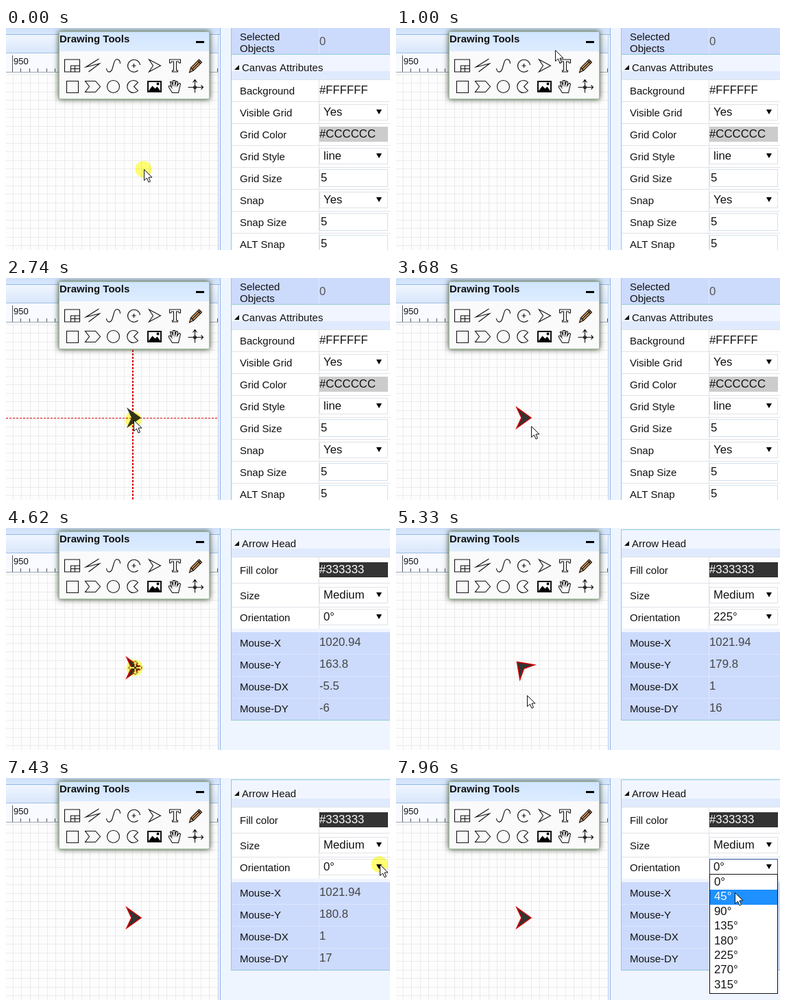
An HTML page with a canvas for the animation above (8000 ms loop, 560 px wide and 324 px high).

```html
<!DOCTYPE html>
<html lang="en">
<head>
<meta charset="utf-8">
<title>Arrow head orientation</title>
<style>
html, body { margin: 0; width: 100%; height: 100%; overflow: hidden; background: #eff5ff; }
canvas { display: block; }
</style>
</head>
<body>
<canvas id="stage" width="560" height="324"></canvas>
<script>
const c = document.getElementById('stage').getContext('2d');
const LOOP = 8000, GRID = 12.45, GX = 10, GY = 68, UNIT = 2.5, ROW = 32, ITEM = 21.4;
const SANS = '"Liberation Sans", Arial, sans-serif';
const TEAL = '#8fcbd9', BLUE = '#ccdafc', PALE = '#f0f5ff', LINE = '#dfe2e8', INK = '#111';

// Each move curves from the previous end, past a bend, in held steps
const moves = [
  { from: 590, to: 830, steps: 4, bend: [285, 110], end: [232, 27] },
  { from: 1000, to: 1480, steps: 7, bend: [234, 44], end: [214, 54] },
  { from: 1630, to: 2110, steps: 7, bend: [249, 225], end: [186, 207] },
  { from: 3590, to: 3920, steps: 5, bend: [203, 222], end: [203, 219] },
  { from: 4380, to: 4620, steps: 4, end: [188, 204] },
  { from: 4780, to: 4930, steps: 3, end: [191, 244] },
  { from: 5940, end: [191, 245.3] },
  { from: 6410, end: [191, 247] },
  { from: 6960, to: 7350, steps: 6, bend: [400, 150], end: [545, 126] },
  { from: 7740, to: 7960, steps: 4, end: [494, 167] }
];
const clicks = [[0, 590], [1400, 1480], [2570, 3440], [4230, 4780], [7430, 7740]];

function pointer(t) {
  let pos = [201, 206];
  for (const { from, to, steps = 1, bend, end } of moves) {
    if (t < from) break;
    const k = steps > 1 ? Math.floor((t - from) / (to - from) * (steps - 1) + 1e-6) : 0;
    const p = Math.min(1, (k + 1) / steps), q = 1 - p;
    pos = pos.map((a, i) => {
      const mid = bend ? bend[i] : (a + end[i]) / 2;
      return q * q * a + 2 * p * q * mid + p * p * end[i];
    });
  }
  return pos;
}

// Canvas coordinates, then distance from where the drag began
function mouse(t) {
  const [x, y] = pointer(Math.min(t, 6959));
  const units = px => Math.round(px / UNIT * 2) / 2;
  const [ax, ay] = t < 4780 ? [5.5, 6] : [0, 0];
  const dx = units(x - 188 - ax * UNIT), dy = units(y - 204 - ay * UNIT);
  return [1020.94 + ax + dx, 163.8 + ay + dy, dx, dy];
}

const angle = t => t < 5080 || t >= 6090 ? 0 : t < 5330 ? 45 : t < 5630 ? 225 : 315;

function rect(x, y, w, h, fill) { c.fillStyle = fill; c.fillRect(x, y, w, h); }

function frame(x, y, w, h, color, fill) {
  rect(x, y, w, h, color);
  rect(x + 1, y + 1, w - 2, h - 2, fill);
}

function text(s, x, y, size = 15, color = INK, weight = '') {
  c.font = `${weight} ${size}px ${SANS}`;
  c.fillStyle = color;
  c.fillText(s, x, y);
}

const value = (s, x, y, color) => text(s, x, y, 16.8, color);

function vGrad(y0, y1, a, b) {
  const g = c.createLinearGradient(0, y0, 0, y1);
  g.addColorStop(0, a);
  g.addColorStop(1, b);
  return g;
}

function shape(d, x, y, fill, stroke, width = 1, deg = 0) {
  const p = new Path2D(d);
  c.save();
  c.translate(x, y);
  c.rotate(deg * Math.PI / 180);
  c.lineWidth = width;
  if (fill) { c.fillStyle = fill; c.fill(p); }
  if (stroke) { c.strokeStyle = stroke; c.stroke(p); }
  c.restore();
}

const HEAD = 'M12 0L-9-15L-2 0L-9 15Z';
const ARROW = 'M0 0V16L4 12.5L6.500 18.500L9 17.500L6.500 11.500H11.500Z';
const icons = [
  'M-11-9H11V9H-11ZM-2 9V0H11M-2 4.500H11M4 0V9',
  'M9-10L-10 2L10-3L-6 9',
  'M-10 4C-9 11-3 11-1 3L1-4C3-12 10-10 10-3',
  'M6 7A9 9 0 1 1 9-1M-3 0H3M0-3V3',
  'M-8-9L9 0L-8 9L-2 0Z',
  'M-8-9H8V-4H6L5-6H2V7H4V9H-4V7H-2V-6H-5L-6-4H-8Z',
  'M-9 10L-7 3L5-9L9-5L-3 7ZM-7 3L-3 7M3-7L7-3M-5 5L7-7',
  'M-8-8H9V9H-8Z',
  'M-11-8H4L11 0L4 8H-11L-5 0Z',
  'M9 0A9 9 0 1 1-9 0A9 9 0 1 1 9 0',
  'M6-6A9 9 0 1 0 6 6L0 0Z',
  'M-10-8H10V8H-10ZM-9-7H9V7H-9Z',
  'M-4 9L-9 1C-10-2-7-2-5 1L-7-7L-5-7L-3-2V-9H0V-2L2-8L4-7L3-1L6-5L8-4L5 9Z',
  'M-11 1H11M8-2L11 1L8 4M-1 9V-9M-4-6L-1-10L2-6M-3 1A2 2 0 1 0 1 1A2 2 0 1 0-3 1'
];

function workspace() {
  rect(0, 0, 313, 10, vGrad(0, 10, '#cddffa', '#dce9fb'));
  rect(0, 9, 313, 1, '#8fb5e8');
  rect(0, 10, 309, 27, vGrad(10, 37, '#f0f6ff', '#d8e6fa'));
  rect(0, 36, 310, 1, '#9fbfe8');
  rect(0, 37, 310, 28, '#f8faff');
  rect(0, 65, 310, 259, '#fdfdfd');
  for (let i = 0; i < 25; i++) {
    const x = Math.round(GX + i * GRID), y = Math.round(GY + i * GRID);
    rect(x, 65, 1, 259, '#ebebeb');
    rect(0, y, 310, 1, '#ebebeb');
    const top = i % 10 ? 59 : 40;
    rect(x - 1, top, 1, 64 - top, '#555');
  }
  text('950', 11, 53, 13);
  rect(0, 64, 310, 1, '#9aa7b8');
  rect(309, 10, 1, 314, '#b9cdea');
  rect(312, 0, 1, 324, '#8fb5e8');
}

function palette() {
  c.save();
  c.shadowColor = '#36462f';
  c.shadowBlur = 8;
  rect(77, 5, 220, 99, '#9fbd98');
  c.restore();
  rect(78, 6, 218, 28, vGrad(6, 34, '#d0e5ff', '#deedff'));
  rect(78, 34, 218, 69, '#fafafa');
  text('Drawing Tools', 78, 21, 15, INK, 'bold');
  rect(277, 19, 12, 3, '#000');
  icons.forEach((d, i) =>
    shape(d, 96.5 + i % 7 * 30, i < 7 ? 55 : 85.5, i === 6 && '#e0a060', INK, 1.1));
  shape('M-9 7L-3-1L1 3L4 0L9 7ZM3-4A2 2 0 1 0 7-4A2 2 0 1 0 3-4', 216.5, 85.5, '#000');
}

function header(label, y, h) {
  rect(329, y, 231, h, PALE);
  rect(329, y + h - 12, 231, 12, '#e0eafe');
  shape('M8-3V4H1Z', 332, y + 19, INK);
  text(label, 344, y + 25);
}

function row(label, y, base) {
  rect(329, y, 231, 1, LINE);
  text(label, 341, base);
}

function select(s, y, open) {
  frame(457, y, 100, 24, open ? '#2a4f9c' : '#dfe2e6', '#fff');
  value(s, 463, y + 17);
  shape('M0 0H8L4 7Z', 540, y + 8, '#000');
}

function swatch(s, y, fill, color) {
  rect(457, y, 100, 22, fill);
  value(s, 457, y + 16, color);
}

function input(s, y) {
  frame(457, y, 100, 26, '#d3e0ec', '#fff');
  value(s, 459, y + 18);
}

function canvasPanel() {
  rect(328, 0, 232, 324, '#fff');
  rect(329, 0, 231, 38, BLUE);
  rect(456, 0, 1, 38, '#dfe7fb');
  text('Selected', 341, 18);
  text('Objects', 341, 35);
  value('0', 457, 25, '#555');
  header('Canvas Attributes', 38, 37);
  rect(329, 38, 231, 1, TEAL);
  ['Background', 'Visible Grid', 'Grid Color', 'Grid Style', 'Grid Size', 'Snap', 'Snap Size', 'ALT Snap']
    .forEach((s, i) => row(s, 75 + i * ROW, 97 + i * ROW));
  rect(456, 75, 1, 249, LINE);
  swatch('#FFFFFF', 80, '#fff');
  select('Yes', 111);
  swatch('#CCCCCC', 144, '#ccc');
  select('line', 175);
  input('5', 206);
  select('Yes', 239);
  input('5', 270);
  input('5', 302);
  rect(328, 0, 1, 324, TEAL);
}

function arrowPanel(t) {
  rect(328, 2, 232, 279, TEAL);
  rect(329, 42, 231, 110, '#fff');
  header('Arrow Head', 3, 39);
  row('Fill color', 42, 67);
  row('Size', 80, 104);
  row('Orientation', 115, 136);
  rect(329, 147, 231, 5, PALE);
  rect(329, 152, 231, 128, BLUE);
  const at = mouse(t);
  ['X', 'Y', 'DX', 'DY'].forEach((s, i) => {
    if (i) rect(329, 152 + i * ROW, 231, 1, '#dde6fc');
    text('Mouse-' + s, 341, 173 + i * ROW);
    value(String(+at[i].toFixed(2)), 457, 172 + i * ROW, '#444');
  });
  rect(456, 42, 1, 105, LINE);
  rect(456, 152, 1, 128, '#dde6fc');
  swatch('#333333', 50, '#333', '#fff');
  select('Medium', 86);
  select(angle(t) + '°', 118, t >= 7510);
}

function dropdown(py) {
  const top = 141.5, hover = Math.max(0, Math.floor((py - top) / ITEM));
  frame(457, 140, 100, 175, INK, '#fff');
  for (let i = 0; i < 8; i++) {
    const y = top + i * ITEM, on = i === hover;
    if (on) rect(458, Math.round(y), 98, 22, '#1e90ff');
    value(i * 45 + '°', 464, Math.round(y + 15.5), on ? '#fff' : INK);
  }
}

function dashed(x0, y0, x1, y1, width) {
  c.save();
  c.strokeStyle = '#e00000';
  c.lineWidth = width;
  c.setLineDash([3, 2]);
  c.beginPath();
  c.moveTo(x0, y0);
  c.lineTo(x1, y1);
  c.stroke();
  c.restore();
}

function drawing(t, px, py) {
  if (t < 1630 || py < 104) return;
  const snap = (v, o) => Math.round(o + Math.floor((v - o) / GRID + .01) * GRID);
  const done = t >= 2110;
  const x = done ? 185 : snap(px, GX), y = done ? 204 : snap(py, GY);
  const layers = [() => shape(HEAD, x, y, '#333', t >= 3590 && '#d40000', 1.5, angle(t))];
  if (t < 3290) layers.push(() => {
    dashed(0, y + .5, 310, y + .5, 1);
    dashed(x, 65, x, 323, 2);
  });
  if (t >= 2740) layers.reverse();
  layers.forEach(draw => draw());
}

function highlight(x, y) {
  c.save();
  c.globalCompositeOperation = 'multiply';
  c.beginPath();
  c.arc(x - .5, y, 12, 0, 7);
  c.fillStyle = '#ffff73';
  c.fill();
  c.restore();
}

function moveCursor(x, y) {
  for (let deg = 0; deg < 360; deg += 90)
    shape('M-1.500-1.500V-6H-4L0-10L4-6H1.500V-1.500', x + .5, y, '#ffe96a', '#5a3200', 1, deg);
}

function render(t) {
  const [px, py] = pointer(t);
  rect(0, 0, 560, 324, '#eff5ff');
  workspace();
  drawing(t, px, py);
  palette();
  if (t < 4380) canvasPanel(); else arrowPanel(t);
  if (t >= 7510) dropdown(py);
  if (clicks.some(([a, b]) => t >= a && t < b)) highlight(px, py);
  if (t >= 4380 && t < 4780) moveCursor(px, py);
  else shape(ARROW, Math.round(px) + .5, Math.round(py) + .5, '#fff', INK);
}

const start = performance.now();
function tick() {
  render((performance.now() - start) % LOOP);
  requestAnimationFrame(tick);
}
tick();
</script>
</body>
</html>
```
